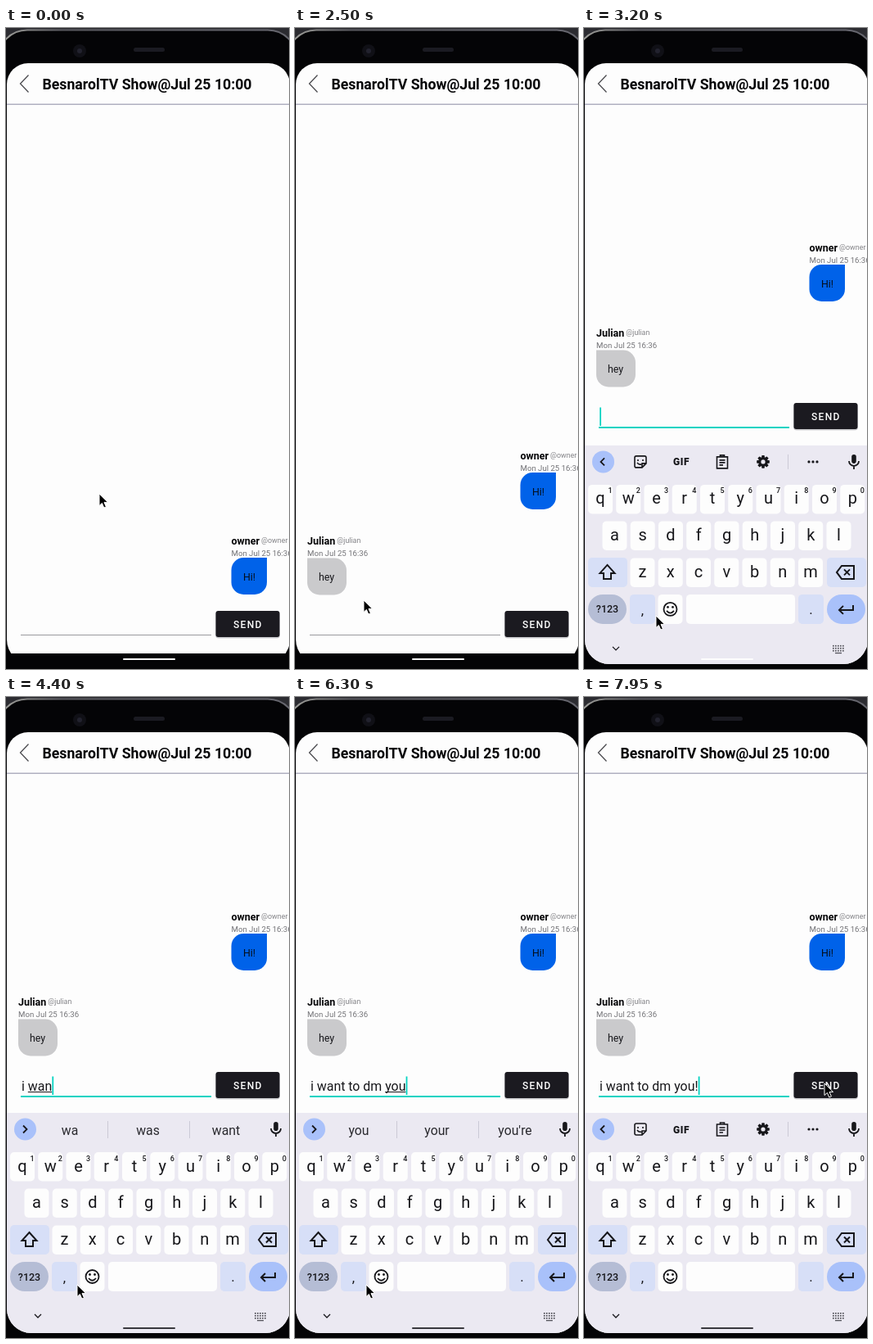
An HTML page with a canvas that plays this animation: 346x783 px, repeating every 8000 ms.

```html
<!DOCTYPE html>
<html lang="en">
<head>
<meta charset="utf-8">
<title>Chat</title>
<style>
html, body { margin: 0; width: 100%; height: 100%; overflow: hidden; background: #040406; }
canvas { display: block; }
</style>
</head>
<body>
<canvas id="stage" width="346" height="783"></canvas>
<script>
const ctx = document.getElementById('stage').getContext('2d');
const LOOP = 8000;
const PAPER = '#fdfdfd', INK = '#17171b', BEZEL = '#040406', PANEL = '#ebe9f2';
const TEAL = '#06d3c2', ACCENT = '#a9c1fa', SOFT = '#d7dff7', RULE = '#cbcad6';

// Moments in ms
const INDICATOR = 700, REPLY = 1900, FOCUS = 2800, OPEN = 2900, SLIDE = 2950, SLIDE_END = 3260;

const MESSAGE = 'i want to dm you!';
const KEY_TIMES = [3750, 3900, 4050, 4200, 4350, 4500, 4650, 4850, 5000, 5150, 5350, 5500, 5650, 5850, 6000, 6150, 6600];
const SUGGESTIONS = {
  'i': ['i', 'I', "I'm"], 'i ': ['am', 'have', 'will'],
  'w': ['w', 'was', 'will'], 'wa': ['wa', 'was', 'want'], 'wan': ['wan', 'want', 'wanna'],
  'want': ['want', 'wants', 'wanted'], 'want ': ['to', 'you', 'the'],
  't': ['t', 'to', 'the'], 'to': ['to', 'too', 'today'], 'to ': ['be', 'go', 'see'],
  'd': ['d', 'do', 'day'], 'dm': ['dm', 'do', 'DM'], 'dm ': ['you', 'me', 'the'],
  'y': ['y', 'you', 'yes'], 'yo': ['yo', 'you', 'your'], 'you': ['you', 'your', "you're"]
};
const POINTER = [[0, 114, 569], [2050, 114, 569], [2500, 84, 699], [2700, 88, 718],
                 [3400, 88, 718], [4000, 87, 718], [6900, 87, 718], [7600, 294, 472]];

function box(x, y, w, h, r, color) {
  ctx.beginPath();
  ctx.roundRect(x, y, w, h, r);
  ctx.fillStyle = color;
  ctx.fill();
}

function disc(x, y, r, color) {
  ctx.beginPath();
  ctx.arc(x, y, r, 0, 7);
  ctx.fillStyle = color;
  ctx.fill();
}

function text(str, x, y, size, { weight = 400, color = INK, align = 'left', spacing = 0 } = {}) {
  ctx.font = `${weight} ${size}px Roboto, sans-serif`;
  ctx.letterSpacing = spacing + 'px';
  ctx.textAlign = align;
  ctx.fillStyle = color;
  ctx.fillText(str, x, y);
  return ctx.measureText(str).width;
}

function icon(x, y, path, { width = 1.8, stroke = INK, fill } = {}) {
  const shape = new Path2D(path);
  ctx.save();
  ctx.translate(x, y);
  if (fill) { ctx.fillStyle = fill; ctx.fill(shape); }
  ctx.lineWidth = width;
  ctx.strokeStyle = stroke;
  ctx.stroke(shape);
  ctx.restore();
}

function typedAt(t) {
  return MESSAGE.slice(0, KEY_TIMES.filter(k => k <= t).length);
}

function drawFrame() {
  ctx.fillStyle = '#2c2c31';
  ctx.fillRect(0, 0, 346, 783);
  const rim = ctx.createLinearGradient(0, 0, 346, 0);
  rim.addColorStop(0, '#9b9b97');
  rim.addColorStop(0.2, '#5a5a60');
  rim.addColorStop(1, '#66666e');
  box(-10, 2.5, 366, 820, 36, BEZEL);
  ctx.strokeStyle = rim;
  ctx.lineWidth = 2;
  ctx.stroke();
  disc(90, 28, 8, '#101016');
  disc(90, 28, 3, '#22222e');
  box(156, 24, 38, 5, 2.5, '#1b1b22');
}

function drawHeader() {
  icon(22.5, 68, 'M5 -10.5 L-5 0 L5 10.5', { width: 1.3, stroke: '#4c4c50' });
  text('BesnarolTV Show@Jul 25 10:00', 300.5, 75, 17.7, { weight: 700, align: 'right', color: '#050507' });
  ctx.fillStyle = '#b0b0c0';
  ctx.fillRect(0, 92.5, 346, 1.5);
}

function drawSender(name, x, y) {
  const width = text(name, x, y + 4.5, 12.5, { weight: 700, color: '#050507' });
  text('@' + name.toLowerCase(), x + width + 2, y + 3, 8.9, { color: '#828286' });
  text('Mon Jul 25 16:36', x, y + 18.5, 9.63, { color: '#737377' });
}

function drawTypingDots(t, y) {
  box(17, y + 21, 74, 35, 17.5, '#ececee');
  for (let i = 0; i < 3; i++) {
    const phase = (t - 1320) / 900 - (i - 1) * 0.25;
    const pulse = 0.5 + 0.5 * Math.cos(phase * 2 * Math.PI);
    const shade = 222 - 18 * pulse;
    disc(36 + i * 17.6, y + 39, 5.6 + 1.5 * pulse, `rgb(${shade},${shade},${shade + 2})`);
  }
}

function drawMessages(t, shift) {
  const replied = t >= REPLY, waiting = t >= INDICATOR && !replied;
  const y = 626 + shift, first = y - (replied ? 104 : waiting ? 94 : 0);
  drawSender('owner', 275.5, first);
  box(275.5, first + 21, 43.5, 45, [15, 0, 15, 15], '#0062e9');
  text('Hi!', 290, first + 49, 12.4, { color: '#04101f' });
  if (waiting) {
    drawSender('Julian', 15, y + 10);
    drawTypingDots(t, y + 10);
  }
  if (replied) {
    drawSender('Julian', 15, y);
    box(15, y + 21.5, 48, 45, [0, 15, 15, 15], '#cacacc');
    text('hey', 29, y + 49, 12.4);
  }
}

function drawInput(t, shift) {
  box(256, 712.5 + shift, 79, 33, 4, '#c8c8cc');
  box(256.5, 712 + shift, 78, 32, 3, '#1b1a20');
  text('SEND', 278, 732.5 + shift, 12, { weight: 500, color: PAPER, spacing: 1.3 });
  const focused = t >= FOCUS;
  ctx.fillStyle = focused ? TEAL : '#9a9a9e';
  ctx.fillRect(18, 741 + shift, 233, focused ? 2 : 1);
  if (!focused) return;

  const value = typedAt(t), baseline = 734.5 + shift;
  const end = 19 + text(value, 19, baseline, 15.9);
  const word = value.match(/\w*$/)[0];
  const wordWidth = ctx.measureText(word).width;
  ctx.fillStyle = INK;
  ctx.fillRect(end - wordWidth, baseline + 1.5, wordWidth, 1);
  const lastKey = value ? KEY_TIMES[value.length - 1] : FOCUS;
  if ((t - lastKey) % 1000 < 500) {
    ctx.fillStyle = TEAL;
    ctx.fillRect(end + 0.2, baseline - 17, 1.8, 22.5);
  }
}

function drawMic(x, y) {
  box(x - 2.8, y - 9, 5.6, 11, 2.8, INK);
  icon(x, y, 'M-6 -1 A6 6 0 0 0 6 -1 M0 5 V9');
}

function drawToolbar() {
  icon(23, 528, 'M2 -4.5 L-2.5 0 L2 4.5');
  icon(69, 528, 'M-7 -5 Q-7 -7 -5 -7 H5 Q7 -7 7 -5 V2 L2 7 H-5 Q-7 7 -7 5 Z M7 2 H2 V7 M-3 -3 V-1 M3 -3 V-1 M-4 1 Q-2 4 1 3', { width: 1.6 });
  text('GIF', 119, 532.5, 12, { weight: 900, align: 'center', spacing: 0.6 });
  icon(169, 528, 'M-6.5 -6 H6.5 V8 H-6.5 Z M-2.5 -6 V-8 H2.5 V-6 M-3.5 -2 H3.5 M-3.5 1 H3.5 M-3.5 4 H1', { width: 1.6 });
  for (let i = 0; i < 8; i++) {
    ctx.save();
    ctx.translate(219, 528);
    ctx.rotate(i * Math.PI / 4);
    box(-1.8, -7.8, 3.6, 4, 0.8, INK);
    ctx.restore();
  }
  icon(219, 528, 'M-4.2 0 A4.2 4.2 0 1 1 4.2 0 A4.2 4.2 0 1 1 -4.2 0', { width: 3.2 });
  ctx.fillStyle = RULE;
  ctx.fillRect(249, 519, 1, 18);
  for (const x of [275, 280, 285]) disc(x, 528, 1.6, INK);
}

function drawSuggestions(words) {
  icon(23, 528, 'M-2 -4.5 L2.5 0 L-2 4.5');
  words.forEach((word, i) => text(word, 78 + i * 95.5, 534.5, 15.8, { align: 'center', color: '#2a2a2f' }));
  ctx.fillStyle = RULE;
  ctx.fillRect(124, 518, 1, 21);
  ctx.fillRect(224, 518, 1, 21);
}

function drawKeyRow(letters, x, y, digits = '') {
  [...letters].forEach((letter, i) => {
    const cx = x + i * 34.25;
    box(cx - 15, y - 17.5, 30, 35.5, 5, PAPER);
    text(letter, cx, y + 6, 20, { align: 'center' });
    if (digits) text(digits[i], cx + 12, y - 7, 9, { align: 'center', weight: 500 });
  });
}

function drawKeyboard(t, drop) {
  ctx.save();
  ctx.translate(0, drop);
  ctx.fillStyle = PANEL;
  ctx.fillRect(0, 508, 346, 290);

  disc(23.5, 528, 13.5, ACCENT);
  // The suggestion strip trails the typing a little
  const word = typedAt(t - 100).match(/\w* ?$/)[0];
  if (SUGGESTIONS[word]) drawSuggestions(SUGGESTIONS[word]);
  else drawToolbar();
  drawMic(330, 528);

  drawKeyRow('qwertyuiop', 20, 573.5, '1234567890');
  drawKeyRow('asdfghjkl', 37.5, 618);
  drawKeyRow('zxcvbnm', 71.5, 663);
  box(5, 645, 48, 36, 5, SOFT);
  box(297, 645, 48, 36, 5, SOFT);
  icon(28.5, 663, 'M0 -9 L9 1 H4.5 V8 H-4.5 V1 H-9 Z', { width: 2 });
  icon(320, 663, 'M-11 0 L-5 -8 H10 V8 H-5 Z M-2 -3.5 L5 3.5 M5 -3.5 L-2 3.5', { width: 2 });

  box(5, 690, 47, 36, 18, '#b5bdd5');
  text('?123', 28.5, 712.5, 12.5, { align: 'center', weight: 500 });
  box(56, 690, 31, 36, 5, SOFT);
  text(',', 71.5, 715, 17, { align: 'center' });
  box(90.5, 690, 30, 36, 5, PAPER);
  icon(105.5, 708, 'M-8 0 A8 8 0 1 1 8 0 A8 8 0 1 1 -8 0 M-4.5 2 Q0 7.5 4.5 2');
  disc(102.5, 705.5, 1.4, INK);
  disc(108.5, 705.5, 1.4, INK);
  box(125, 690, 133, 36, 5, PAPER);
  box(262, 690, 31, 36, 5, SOFT);
  text('.', 277.5, 714, 17, { align: 'center' });
  box(297, 690, 47, 36, 18, ACCENT);
  icon(320.5, 708, 'M8.5 -5 V1 H-8 M-3.5 -4 L-8.5 1 L-3.5 6', { width: 2 });

  icon(39, 756, 'M-4 -2 L0 2 L4 -2', { width: 1.3 });
  ctx.fillStyle = '#55555c';
  for (let row = 0; row < 3; row++)
    for (let col = 0; col < 5; col++) ctx.fillRect(304 + col * 3, 752 + row * 3, 1.7, 1.7);
  ctx.fillRect(307, 761, 8, 1.3);
  ctx.restore();
}

function drawPointer(t) {
  const next = POINTER.findIndex(p => p[0] > t);
  let [, x, y] = POINTER.at(-1);
  if (next > 0) {
    const [t0, x0, y0] = POINTER[next - 1], [t1, x1, y1] = POINTER[next];
    const u = (t - t0) / (t1 - t0), ease = u * u * (3 - 2 * u);
    x = x0 + (x1 - x0) * ease;
    y = y0 + (y1 - y0) * ease;
  }
  icon(x, y, 'M0 0 V14.5 L3.4 11.4 L5.8 17 L8.4 15.9 L6 10.4 H10.6 Z', { width: 1, stroke: '#fff', fill: '#000' });
}

function render(t) {
  const open = t >= OPEN, shift = open ? -254 : 0;
  drawFrame();
  ctx.save();
  ctx.beginPath();
  ctx.roundRect(1, 43, 346, 734, [26, 26, 30, 30]);
  ctx.clip();
  ctx.fillStyle = PAPER;
  ctx.fillRect(0, 43, 346, open ? 740 : 721);
  drawHeader();
  drawMessages(t, shift);
  drawInput(t, shift);
  if (t >= SLIDE) {
    const left = Math.max(0, (SLIDE_END - t) / (SLIDE_END - SLIDE));
    drawKeyboard(t, 275 * left ** 3);
  }
  box(143, 770, 64, 2, 1, t >= SLIDE_END ? '#39393e' : PAPER);
  ctx.restore();
  drawPointer(t);
}

const start = performance.now();
function tick() {
  render((performance.now() - start) % LOOP);
  requestAnimationFrame(tick);
}
tick();
</script>
</body>
</html>
```
